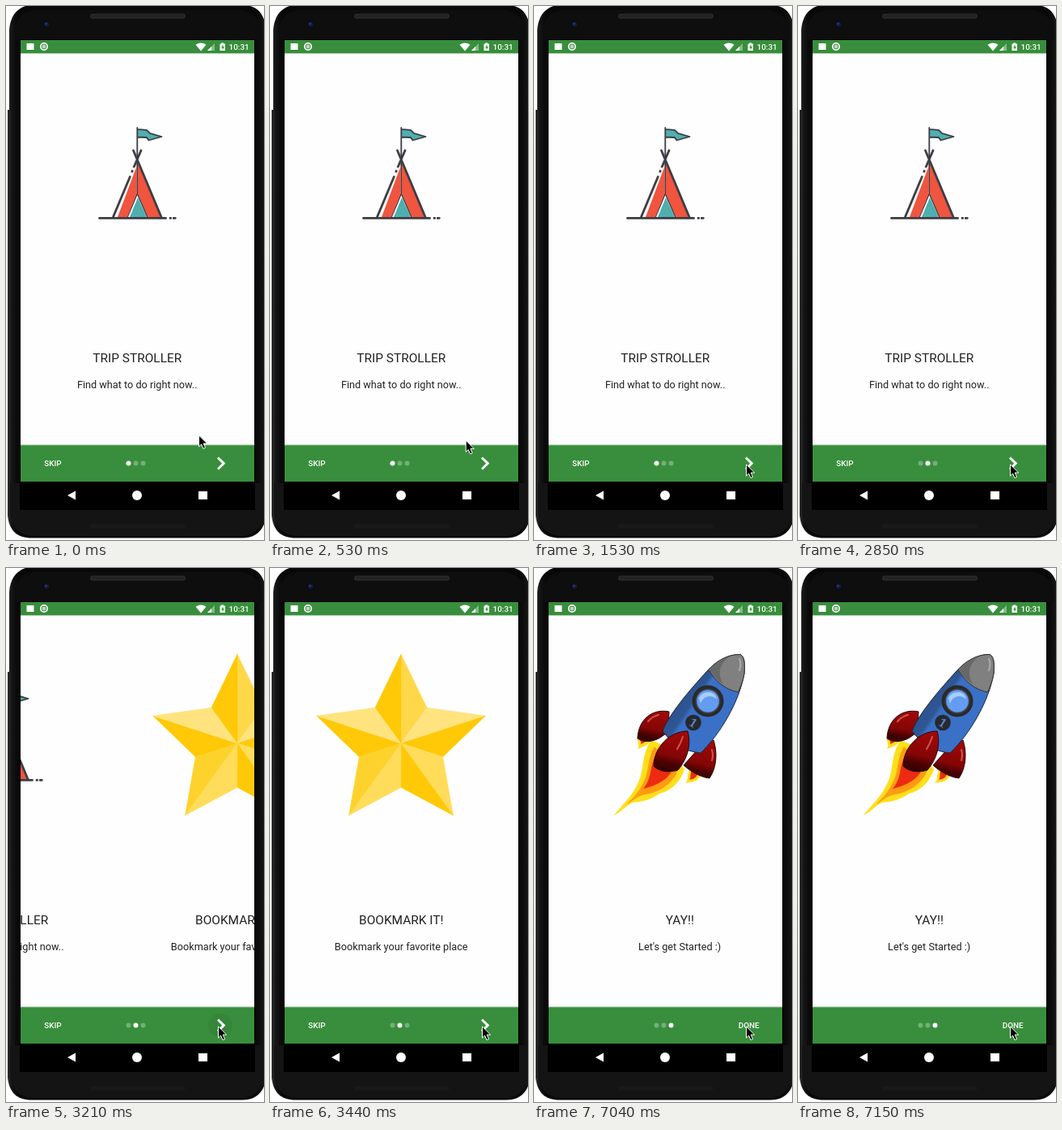
These frames come from a looping animation (319x658 px, 8 s). An HTML page:

```html
<!DOCTYPE html>
<html lang="en">
<head>
<meta charset="utf-8">
<title>App intro</title>
<style>
html, body { margin: 0; width: 100%; height: 100%; overflow: hidden; background: #fff; }
svg { display: block; width: 100vw; height: 100vh; }
text { font-family: Roboto, sans-serif; }
.title { font-size: 15.45px; fill: #212121; text-anchor: middle; }
.sub { font-size: 12.7px; fill: #212121; text-anchor: middle; }
.btn { font-size: 9.9px; font-weight: 500; fill: #fff; }
.ink { fill: none; stroke: #3e3d43; stroke-width: 2.8; stroke-linecap: round; stroke-linejoin: round; }
.thin { stroke-width: 1.8; }
.fin { fill: url(#fin); stroke: #250808; }
.shine { fill: none; stroke: #c9534c; stroke-width: 2.2; stroke-linecap: round; }
</style>
</head>
<body>
<svg viewBox="0 0 319 658" preserveAspectRatio="none">
  <defs>
    <clipPath id="screen"><rect x="18" y="58" width="289" height="483"/></clipPath>
    <linearGradient id="side">
      <stop offset="0" stop-color="#2c2d2e"/>
      <stop offset=".015" stop-color="#161617"/>
      <stop offset=".04" stop-color="#080808"/>
      <stop offset=".96" stop-color="#080808"/>
      <stop offset="1" stop-color="#1a1a1b"/>
    </linearGradient>
    <linearGradient id="hull" gradientUnits="userSpaceOnUse" x1="165" y1="160" x2="215" y2="194">
      <stop offset="0" stop-color="#2e5290"/>
      <stop offset=".22" stop-color="#2f5694"/>
      <stop offset=".3" stop-color="#3a70c6"/>
      <stop offset="1" stop-color="#3a70c6"/>
    </linearGradient>
    <linearGradient id="fin" x1=".6" y1="0" x2=".4" y2="1">
      <stop offset="0" stop-color="#a00909"/>
      <stop offset=".6" stop-color="#850505"/>
      <stop offset=".8" stop-color="#4a0202"/>
      <stop offset="1" stop-color="#330101"/>
    </linearGradient>
  </defs>

  <!-- phone -->
  <path fill="url(#side)" d="M4 128V30C5 14 12 4 24 0H302C313 3 320 12 322 30V628C319 646 309 655.500 292 655.500H32C13 655.500 4 646 2 628V128Z"/>
  <path fill="#0e0e0f" d="M10 42V30Q14 8 34 5H290Q312 8 316 30V42Z"/>
  <path fill="#141415" d="M5 588H319V626Q314 652 292 653H34Q9 652 5 626Z"/>
  <rect x="17" y="41" width="291" height="580"/>
  <rect x="104" y="9.500" width="118" height="6" rx="3" fill="#2b2828"/>
  <rect x="106" y="11.500" width="114" height="2" rx="1" fill="#211f1f"/>
  <rect x="104" y="638" width="118" height="6" rx="3" fill="#191919"/>
  <circle cx="50" cy="22.500" r="5.500" fill="#0c0d12"/>
  <circle cx="50" cy="22.500" r="3" fill="#161c3c"/>
  <circle cx="49.500" cy="22" r="1.100" fill="#36478a"/>

  <rect x="18" y="42" width="289" height="544.300" fill="#388e3c"/>
  <rect x="18" y="58.400" width="289" height="482.600" fill="#fefefe"/>

  <!-- status bar -->
  <g fill="#fff">
    <rect x="25.500" y="46" width="9" height="8"/>
    <circle cx="47" cy="50" r="5"/>
    <circle cx="47" cy="50" r="3" fill="#b9d8ba" stroke="#388e3c"/>
    <path d="M234.500 47.800Q241 43.200 247.500 47.800L241 55.500Z"/>
    <path d="M258 46V55H249Z" opacity=".4"/>
    <path d="M254 50V55H249Z"/>
    <path d="M266 45.500H269V46.500H271V55H264.500V46.500H266Z"/>
    <path d="M268.500 47.500L266 51.500H267.600V54L270 50.200H268.500Z" fill="#388e3c"/>
    <text class="btn" x="275.600" y="53.900">10:31</text>
  </g>

  <g clip-path="url(#screen)">
    <g id="strip">
      <g>
        <path fill="#4fafae" d="M163 152L174 153L178 157L192 161L177 165L174 162H163Z"/>
        <path class="ink thin" d="M162.300 150V231M163 151.800L174 152.800L178 156.800L192.500 161L176.500 165.500L174 162L163 161.500M162.300 231L150 260M162.300 231L175 260"/>
        <path fill="#ef553f" d="M161 199L138 260H150L161.500 232V199ZM163 192V231L175.500 260H191Z"/>
        <path fill="#4fafae" d="M163 236L153 260H174Z"/>
        <path class="ink" d="M157.500 178L192 260M167 178L158.300 198M156.200 203.300L155.900 204M153.300 210.500L132.500 260"/>
        <path class="ink" d="M115.500 261.400H197.500M203 261.400H203.600M207.200 261.400H209.300"/>
        <text class="title" x="162.300" y="439.300">TRIP STROLLER</text>
        <text class="sub" x="162.200" y="471">Find what to do right now..</text>
      </g>
      <g transform="translate(289)">
        <g id="star"></g>
        <text class="title" x="162.300" y="439.300">BOOKMARK IT!</text>
        <text class="sub" x="162.200" y="471">Bookmark your favorite place</text>
      </g>
      <g transform="translate(578)">
        <path fill="#ffdf1b" d="M127 212C113 233 120 248 109 268C103 281 92 291 80.500 305C91 300 95 293 104 289C115 288 126 286 137 278C151 275 163 264 168 248L150 222Z"/>
        <path fill="#ffdf1b" d="M111 205C107 213 114 216 110 223C118 220 125 218 127 210ZM175 247C170 257 174 260 169 265C179 264 187 262 188 254Z"/>
        <path fill="#ff9a12" d="M131 220C120 240 126 252 114 270C110 279 101 286 96 292C106 285 112 280 120 279C139 276 155 264 160 249Z"/>
        <path fill="#ee2b12" d="M133 230C124 247 129 257 117 272C132 268 148 262 153 248ZM113 206C111 211 115 212 114 217C119 215 122 213 123 209ZM177 249C174 255 177 257 174 261C181 260 184 257 184 253Z"/>
        <path class="fin" d="M149 177C129 173 111 186 110 210C117 215 128 215 138 209L148 202Z"/>
        <path class="fin" d="M204 212C209 227 208 246 199 259C189 258 177 252 167 243L184 224Z"/>
        <path fill="url(#hull)" stroke="#20262f" d="M237 106.500C221 106 206 116 196 127C174 151 149 180 141 201C153 217 169 226 188 228C213 204 236 164 242 130C243 116 242 109 237 106.500Z"/>
        <path fill="#808080" stroke="#333" d="M237 106.500C221 106 206 116 198 125C206 140 219 150 234.500 153C239 143 241 136 242 130C243 116 242 109 237 106.500Z"/>
        <path fill="#686868" d="M225 108.500C213 112 205 118 199 125C204 134 210 139 216 143C208 128 212 117 225 108.500Z"/>
        <path class="shine" style="stroke:#a8a8a8" d="M236 112Q239 118 236 126"/>
        <circle cx="197" cy="164" r="19.500" fill="#29292b"/>
        <circle cx="197" cy="164" r="15.500" fill="#3d4148"/>
        <circle cx="197" cy="164" r="13.800" fill="#639cf0"/>
        <path fill="#a8cdff" d="M186 160Q190 152 199 153Q207 154 208 162Q202 156 195 159Q190 161 188 167Z"/>
        <circle cx="179" cy="190.500" r="9.800" fill="#26292e"/>
        <text x="179" y="196" transform="rotate(32 179 190.500)" text-anchor="middle" font-size="15" font-weight="700" style="fill:#5b82bd;font-family:'Noto Serif',serif">1</text>
        <path class="fin" d="M172 201C149 201 130 222 130 244C138 252 150 252 160 249C171 236 177 219 172 201Z"/>
        <path class="shine" d="M136 181Q128 183 123 189M166 208Q163 217 159 223M202 224Q204 231 202 237"/>
        <text class="title" x="162.300" y="439.300">YAY!!</text>
        <text class="sub" x="162.200" y="471">Let's get Started :)</text>
      </g>
    </g>
  </g>

  <!-- bottom bar -->
  <rect x="18" y="540.600" width="289" height="1" fill="#74b077"/>
  <text class="btn" id="skip" x="47.200" y="567.200">SKIP</text>
  <g id="dots" fill="#fff">
    <circle cx="151.500" cy="563.500" r="3"/>
    <circle cx="160.500" cy="563.500" r="3"/>
    <circle cx="169.500" cy="563.500" r="3"/>
  </g>
  <circle id="ripple" cx="265" cy="564" r="15" opacity=".05"/>
  <path id="next" fill="none" stroke="#fff" stroke-width="2.900" d="M262 556.500L269.300 563.600L262 570.700"/>
  <text class="btn" id="done" x="252.700" y="567.200">DONE</text>

  <rect x="18" y="586.300" width="289" height="33.700"/>
  <path fill="#fff" d="M76 603L86 597.500V608.500Z"/>
  <circle cx="162" cy="603" r="6" fill="#fff"/>
  <rect x="238" y="598" width="11" height="10" fill="#fff"/>

  <path id="cursor" stroke="#fff" d="M.5 .5V14.500L3.600 11.600L5.900 17L8.500 15.900L6.200 10.600H10.700Z"/>
</svg>
<script>
const LOOP = 8000, PAGE = 289;
const $ = id => document.getElementById(id);
const show = (id, on) => $(id).setAttribute('visibility', on ? 'visible' : 'hidden');
const move = (id, x, y) => $(id).setAttribute('transform', `translate(${x} ${y})`);

// Last row of [time, ...values] that has begun
const at = (rows, t) => rows.filter(r => r[0] <= t).pop();

const scroll = [[0, 0], [3210, 165], [3440, PAGE], [7035, 2 * PAGE - 18], [7150, 2 * PAGE]];
const pages = [[0, 0], [2850, 1], [6920, 2]];
const glide = [470, 530, 590, 650, 710, 770, 820, 880];
const settle = [[880, 261.5, 570], [1000, 261.5, 573], [1060, 261.5, 571],
  [1120, 261, 568], [1230, 261, 565], [1350, 262, 565], [1530, 262, 564.5]];

function pointer(t) {
  if (t >= 880) return at(settle, t).slice(1);
  const k = glide.filter(s => s <= t).length / glide.length;
  const e = k * k * (3 - 2 * k);
  return [238 + 23.5 * e, 528.5 + 41.5 * e];
}

function buildStar() {
  const colors = ['#ffd84a', '#ffe37f', '#ffc907', '#ffdc5a', '#ffc907',
    '#ffdc5a', '#fdd22c', '#ffc907', '#ffe37f', '#ffc907'];
  const point = i => {
    const a = i * Math.PI / 5, r = i % 2 ? 54.5 : 110;
    return `${162 + r * Math.sin(a)},${216 - r * Math.cos(a)}`;
  };
  $('star').innerHTML = colors.map((c, i) =>
    `<polygon points="162,216 ${point(i)} ${point(i + 1)}" fill="${c}" stroke="${c}" stroke-width=".3"/>`).join('');
}

function draw(t) {
  const page = at(pages, t)[1];
  move('strip', -at(scroll, t)[1], 0);
  [...$('dots').children].forEach((d, i) => d.setAttribute('opacity', i === page ? 1 : 0.3));
  show('skip', page < 2);
  show('next', page < 2);
  show('done', page === 2);
  show('ripple', t >= 3210 && t < 3440);
  move('cursor', ...pointer(t));
}

buildStar();
const start = performance.now();
function tick() {
  draw((performance.now() - start) % LOOP);
  requestAnimationFrame(tick);
}
tick();
</script>
</body>
</html>
```
